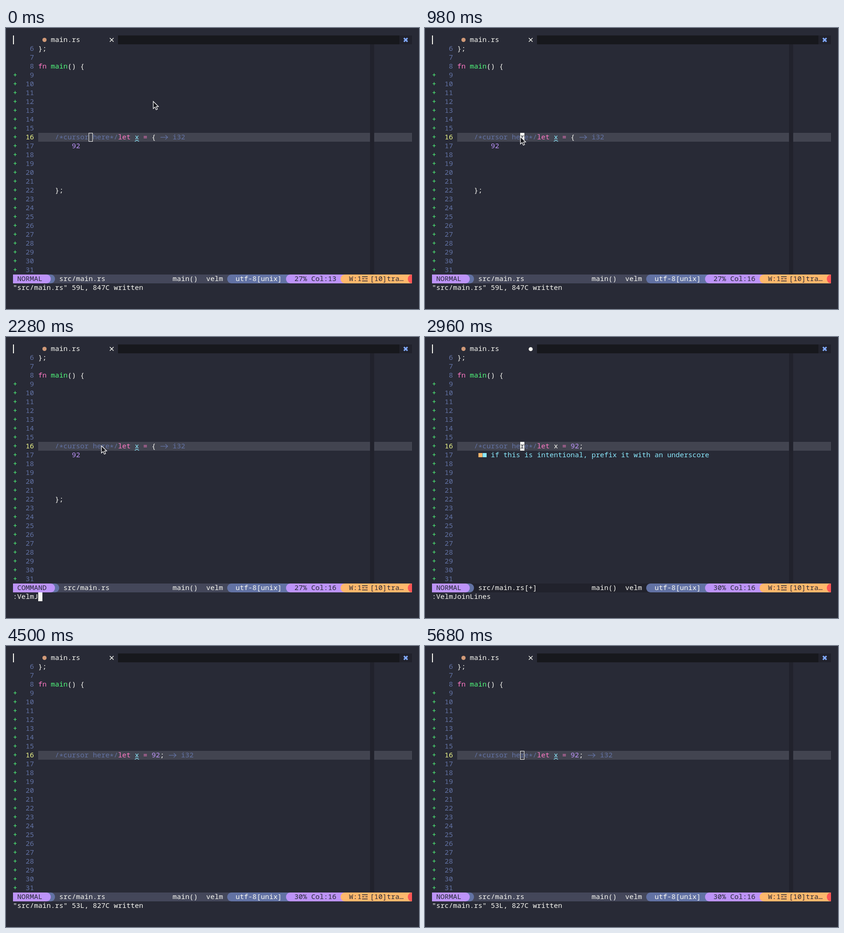
Animation, 885 px wide and 603 px high, one loop 5.7 s. Source, as an HTML page with a canvas:

```html
<!DOCTYPE html>
<html lang="en">
<head>
<meta charset="utf-8">
<title>Join lines</title>
<style>
  html, body { margin: 0; width: 100%; height: 100%; overflow: hidden; background: #282a36; }
  canvas { display: block; }
</style>
</head>
<body>
<canvas id="stage" width="885" height="603"></canvas>
<script>
const ctx = document.getElementById('stage').getContext('2d');
const LOOP = 5700, CELL = 9, LINE = 19, LEFT = 15, TOP = 16;
const CODE_ROW = 11, STATUS_ROW = 27, COMMAND_ROW = 28;
const C = {
  bg: '#282a36', fg: '#f8f8f2', line: '#424450', status: '#44475a', dark: '#21222c',
  tabs: '#17181d', comment: '#6272a4', pink: '#ff79c6', green: '#50fa7b',
  purple: '#bd93f9', cyan: '#8be9fd', orange: '#ffb86c', red: '#ff5555',
  yellow: '#f1fa8c', close: '#82aaff', icon: '#d19a78'
};
const FONT = '15px "Noto Sans Mono", "DejaVu Sans Mono", monospace';

// Time at which each command line text appears; the caret follows while a command is open.
const COMMANDS = [
  [0, '"src/main.rs" 59L, 847C written'],
  [1440, ':'], [1640, ':V'], [1780, ':Ve'], [1840, ':Vel'], [1920, ':Velm'],
  [2280, ':VelmJ'], [2400, ':VelmJo'], [2480, ':VelmJoi'], [2560, ':VelmJoin'],
  [2660, ':VelmJoinLines'],
  [3920, ':'], [4080, ':w'], [4140, '"src/main.rs"'],
  [4160, '"src/main.rs" 53L, 827C written']
];

const colX = col => LEFT + col * CELL;
const rowY = row => TOP + row * LINE;
const within = (t, from, to) => t >= from && t < to;

function rect(x, y, w, h, color) {
  ctx.fillStyle = color;
  ctx.fillRect(x, y, w, h);
}

function cells(col, row, count, color) {
  rect(colX(col), rowY(row), count * CELL, LINE, color);
}

function text(col, row, str, color = C.fg, dy = 0) {
  ctx.font = FONT;
  ctx.fillStyle = color;
  ctx.fillText(str, colX(col), rowY(row) + 14 + dy);
}

function polyline(points, color, width) {
  ctx.beginPath();
  points.forEach(([x, y]) => ctx.lineTo(x, y));
  ctx.strokeStyle = color;
  ctx.lineWidth = width;
  ctx.stroke();
}

function dot(x, y, r, color) {
  ctx.beginPath();
  ctx.arc(x, y, r, 0, Math.PI * 2);
  ctx.fillStyle = color;
  ctx.fill();
}

function cross(x, y, r, color, width) {
  polyline([[x - r, y - r], [x + r, y + r]], color, width);
  polyline([[x - r, y + r], [x + r, y - r]], color, width);
}

// Half-round separator filling one status line cell; side is 1 for right, -1 for left.
function cap(col, side, color, back) {
  cells(col, STATUS_ROW, 1, back);
  const x = colX(col) + (side < 0 ? CELL : 0);
  ctx.beginPath();
  ctx.ellipse(x, rowY(STATUS_ROW) + LINE / 2, CELL, LINE / 2, 0, -Math.PI / 2, Math.PI / 2, side < 0);
  ctx.fillStyle = color;
  ctx.fill();
}

function drawTabs(modified) {
  rect(15, 16, 2, 19, C.fg);
  dot(82.5, 25.5, 4.5, C.icon);
  text(9, 0, 'main.rs');
  if (modified) dot(226.5, 26, 4.3, C.fg);
  else cross(226.5, 25.5, 4, C.fg, 1.5);
  rect(240, 16, 603, 19, C.tabs);
  rect(843, 16, 27, 19, C.dark);
  cross(856.5, 25.5, 3.8, C.close, 3.2);
}

function drawGutter() {
  for (let n = 6; n <= 31; n++) {
    const row = n - 5;
    text(3, row, String(n).padStart(2), n === 16 ? C.yellow : C.comment);
    if (n > 8) text(0, row, '+', C.green);
  }
}

function drawHint(col) {
  const x = colX(col), y = rowY(CODE_ROW) + 9.5;
  polyline([[x + 1, y], [x + 16.5, y]], C.comment, 1.2);
  polyline([[x + 11.5, y - 4.5], [x + 16.5, y], [x + 11.5, y + 4.5]], C.comment, 1.2);
  text(col + 3, CODE_ROW, 'i32', C.comment);
}

function drawCode(joined, checked, warned) {
  cells(6, CODE_ROW, 89, C.line);
  rect(780, 35, 9, 494, C.dark);
  text(6, 1, '};');
  text(6, 3, 'fn', C.pink);
  text(9, 3, 'main', C.green);
  text(13, 3, '() {');

  text(10, CODE_ROW, '/', C.comment);
  text(11, CODE_ROW, '*', C.comment, 3);
  text(12, CODE_ROW, 'cursor here', C.comment);
  text(23, CODE_ROW, '*', C.comment, 3);
  text(24, CODE_ROW, '/', C.comment);
  text(25, CODE_ROW, 'let', C.pink);
  text(29, CODE_ROW, 'x', checked ? C.cyan : C.fg);
  text(31, CODE_ROW, '=', C.pink);
  if (checked) polyline([[276, 243.5], [280.5, 240.5], [285, 243.5]], C.cyan, 1.2);

  if (joined) {
    text(33, CODE_ROW, '92', C.purple);
    text(35, CODE_ROW, ';');
  } else {
    text(33, CODE_ROW, '{');
    text(14, CODE_ROW + 1, '92', C.purple);
    text(10, CODE_ROW + 6, '};');
  }
  if (checked) drawHint(joined ? 37 : 35);
  if (warned) {
    rect(114.5, 249, 8.5, 9, C.orange);
    rect(123.5, 249, 8.5, 9, C.cyan);
    text(14, CODE_ROW + 1, 'if this is intentional, prefix it with an underscore', C.cyan);
  }
}

function drawStatus(mode, modified, position) {
  const back = modified ? C.dark : C.status, end = mode.length + 2;
  cells(0, STATUS_ROW, 95, back);
  cells(0, STATUS_ROW, end, C.purple);
  cap(end, 1, C.purple, C.comment);
  cap(end + 1, 1, C.comment, back);
  text(1, STATUS_ROW, mode, C.bg);
  text(end + 3, STATUS_ROW, 'src/main.rs' + (modified ? '[+]' : ''));
  text(38, STATUS_ROW, 'main()  velm');

  cap(51, -1, C.comment, back);
  cells(52, STATUS_ROW, 13, C.comment);
  text(53, STATUS_ROW, 'utf-8[unix]');
  cap(65, -1, C.purple, C.comment);
  cells(66, STATUS_ROW, 12, C.purple);
  text(67, STATUS_ROW, position, C.bg);
  cap(78, -1, C.orange, C.purple);
  cells(79, STATUS_ROW, 15, C.orange);
  text(80, STATUS_ROW, 'W:1', C.bg);
  rect(763, 533, 12, 1.5, C.bg);
  rect(763, 537.5, 5, 1.5, C.bg);
  rect(770, 537.5, 5, 1.5, C.bg);
  rect(763, 542, 12, 1.5, C.bg);
  text(85, STATUS_ROW, '[10]tra…', C.bg);
  cap(94, -1, C.red, C.orange);
}

function drawCaret(t, commandOpen, command) {
  if (commandOpen) return cells(command.length, COMMAND_ROW, 1, C.fg);
  const col = t < 940 ? 18 : 21;
  if (t < 940 || t >= 5680) {
    ctx.strokeStyle = C.fg;
    ctx.lineWidth = 1;
    ctx.strokeRect(colX(col) + .5, rowY(CODE_ROW) + .5, CELL - 1, LINE - 1);
    return;
  }
  const blinkedOff = [[1240, 1440], [3300, 3600], [4500, 4800], [5280, 5580]];
  if (blinkedOff.some(([from, to]) => within(t, from, to))) return;
  cells(col, CODE_ROW, 1, C.fg);
  text(col, CODE_ROW, 'r', C.bg);
}

function drawPointer(t) {
  if (within(t, 2800, 4800) || t >= 4980) return;
  let x, y;
  if (t < 2800) {
    const p = Math.min(1, Math.max(0, (t - 500) / 420));
    const eased = p * p * (3 - 2 * p);
    x = 315.5 - 111 * eased;
    y = 157.5 + 76 * eased;
  } else {
    const p = (t - 4780) / 200;
    x = 204.5 - 216 * p * p;
    y = 233.5 + 12 * p;
  }
  ctx.save();
  ctx.translate(x, y);
  const outline = new Path2D('M0 0V15.5L3.7 12.2L6.2 18L9 16.8L6.5 11.2H11.3Z');
  ctx.fillStyle = '#15161c';
  ctx.fill(outline);
  ctx.strokeStyle = '#fff';
  ctx.lineWidth = 1.2;
  ctx.stroke(outline);
  ctx.restore();
}

function draw(t) {
  const joined = t >= 2940;
  const modified = within(t, 2940, 4160);
  const commandOpen = within(t, 1440, 2940) || within(t, 3920, 4160);
  const showsCommandMode = within(t, 1480, 2940) || within(t, 3920, 4160);
  const command = COMMANDS.findLast(([start]) => start <= t)[1];
  const position = `${joined ? 30 : 27}% Col:${t < 940 ? 13 : 16}`;

  rect(0, 0, 885, 603, C.bg);
  drawTabs(modified);
  drawGutter();
  drawCode(joined, !joined || t >= 4300, within(t, 2940, 4200));
  drawStatus(showsCommandMode ? 'COMMAND' : 'NORMAL', modified, position);
  text(0, COMMAND_ROW, command);
  drawCaret(t, commandOpen, command);
  drawPointer(t);
}

const start = performance.now();
function tick() {
  const t = (performance.now() - start) % LOOP;
  draw(Math.floor(t / 20) * 20);
  requestAnimationFrame(tick);
}
tick();
</script>
</body>
</html>
```
